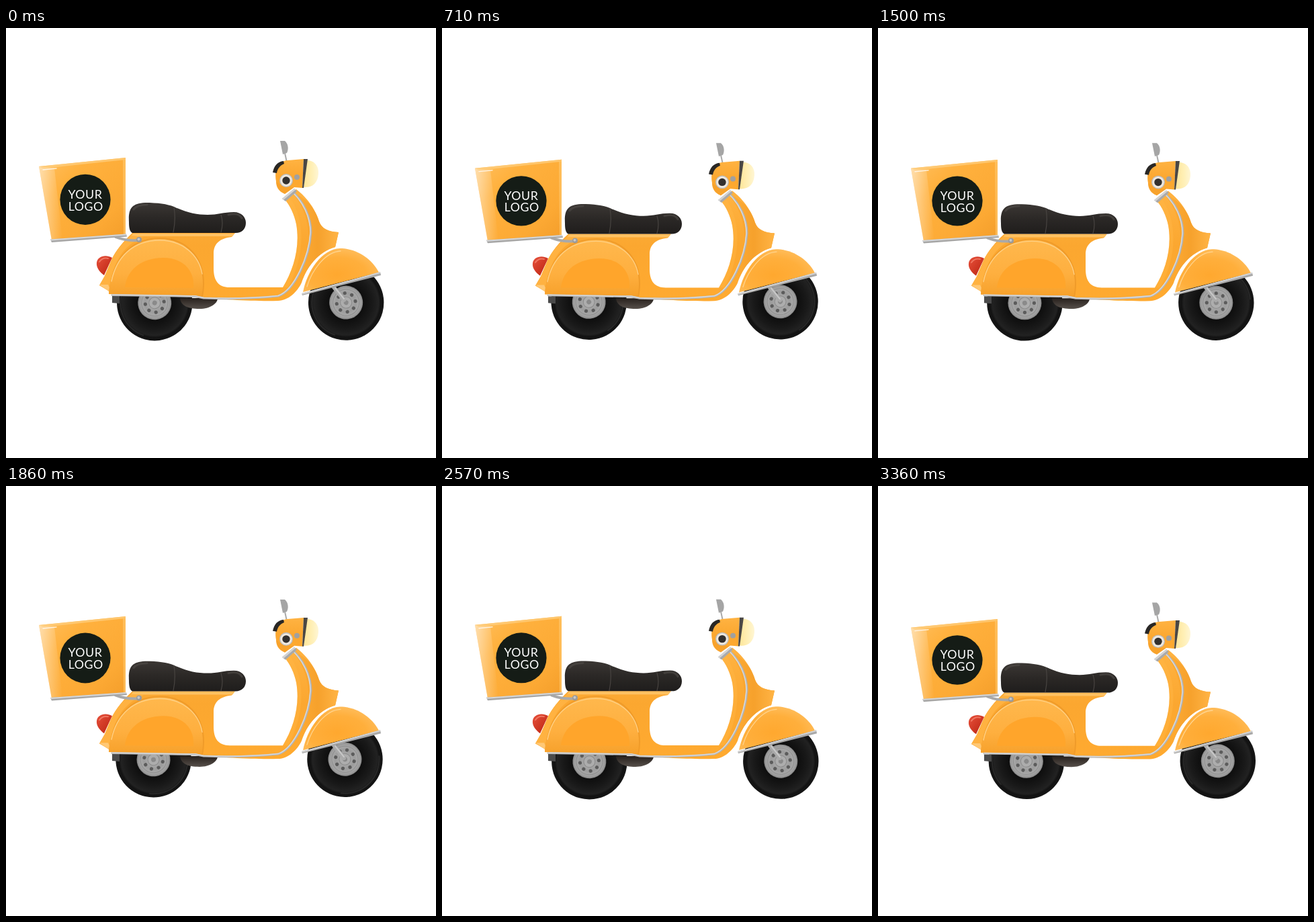
Write an HTML page that moves like this. It is 640 px wide and 640 px high and loops after 3.43 s.

```html
<!DOCTYPE html>
<html lang="en">
<head>
<meta charset="utf-8">
<title>Delivery scooter</title>
<style>
  html, body { margin: 0; width: 100%; height: 100%; overflow: hidden; background: #fff; }
  svg { display: block; width: 100vw; height: 100vh; }
  text { font: 17.8px Lato, "Open Sans", sans-serif; letter-spacing: .5px; fill: #fff; text-anchor: middle; }
  .line { fill: none; stroke-linecap: round; }
</style>
</head>
<body>
<svg viewBox="0 0 640 640">
  <defs>
    <linearGradient id="boxFace" x1="0" y1="0" x2="1" y2="1">
      <stop offset="0" stop-color="#ffc163"/><stop offset=".3" stop-color="#ffb13e"/>
      <stop offset=".75" stop-color="#fca934"/><stop offset="1" stop-color="#f39d2a"/>
    </linearGradient>
    <linearGradient id="boxSide">
      <stop offset="0" stop-color="#fff" stop-opacity=".5"/><stop offset="1" stop-color="#fff" stop-opacity="0"/>
    </linearGradient>
    <linearGradient id="paint" x1="0" y1="0" x2="0" y2="1">
      <stop offset="0" stop-color="#ffb342"/><stop offset=".5" stop-color="#fba730"/><stop offset="1" stop-color="#ffaa30"/>
    </linearGradient>
    <linearGradient id="panel" x1="0" y1="0" x2="0" y2="1">
      <stop offset="0" stop-color="#ffb84d"/><stop offset=".6" stop-color="#feaf3f"/><stop offset="1" stop-color="#f6a02a"/>
    </linearGradient>
    <linearGradient id="shield" x1="0" y1="0" x2="1" y2="0">
      <stop offset="0" stop-color="#ffae38"/><stop offset=".55" stop-color="#f6a12c"/><stop offset="1" stop-color="#ffb445"/>
    </linearGradient>
    <radialGradient id="fender" cx=".45" cy=".6" r=".65">
      <stop offset="0" stop-color="#ffa82f"/><stop offset=".6" stop-color="#ffaf3c"/><stop offset="1" stop-color="#ffbf60"/>
    </radialGradient>
    <linearGradient id="seat" x1="0" y1="0" x2="0" y2="1">
      <stop offset="0" stop-color="#3b3734"/><stop offset=".5" stop-color="#2b2826"/><stop offset="1" stop-color="#1f1d1c"/>
    </linearGradient>
    <linearGradient id="lamp">
      <stop offset="0" stop-color="#ffe69a"/><stop offset=".6" stop-color="#fff0b9"/><stop offset="1" stop-color="#fff6d5"/>
    </linearGradient>
    <linearGradient id="tail" x1="0" y1="0" x2="1" y2="1">
      <stop offset="0" stop-color="#e8513c"/><stop offset="1" stop-color="#b9220f"/>
    </linearGradient>
    <linearGradient id="engine" x1="0" y1="0" x2="0" y2="1">
      <stop offset="0" stop-color="#28211d"/><stop offset="1" stop-color="#57504b"/>
    </linearGradient>
    <radialGradient id="tyre">
      <stop offset=".45" stop-color="#0e0e0e"/><stop offset=".7" stop-color="#191919"/>
      <stop offset=".86" stop-color="#222"/><stop offset=".92" stop-color="#121212"/><stop offset="1" stop-color="#161616"/>
    </radialGradient>
    <radialGradient id="rim">
      <stop offset="0" stop-color="#b4b4b4"/><stop offset=".6" stop-color="#9c9c9c"/>
      <stop offset=".8" stop-color="#a8a8a8"/><stop offset="1" stop-color="#969696"/>
    </radialGradient>
    <g id="wheel">
      <circle r="56.2" fill="url(#tyre)"/>
      <path class="line" d="M-4 51A51 51 0 0 1-49-14" stroke="#3a3a3a" stroke-opacity=".5" stroke-width="2"/>
      <circle r="25" fill="#858585"/>
      <circle r="24" fill="url(#rim)"/>
      <circle r="19.5" fill="none" stroke="#8e8e8e"/>
      <g id="holes" fill="#5c5c5c"></g>
      <circle r="8.5" fill="#adadad" stroke="#8a8a8a"/>
      <circle r="3.5" fill="#8a8a8a"/>
    </g>
  </defs>

  <use class="wheel" data-x="219.8" data-y="408.8" href="#wheel"/>
  <use class="wheel" data-x="504.7" data-y="408.2" href="#wheel"/>

  <g id="body">
    <path class="line" d="M488 386L503 405" stroke="#a9a9a9" stroke-width="6"/>
    <path class="line" d="M490 387L503 403" stroke="#c8c8c8" stroke-width="2"/>
    <path d="M158 399H169V410L158 409Z" fill="#4b4b4b"/>
    <path d="M259 402H315C315 410 304 418 288 418C270 418 260 413 259 402Z" fill="url(#engine)"/>

    <!-- tail light -->
    <path d="M135 349C136 340 148 336 158 342L146 368C139 363 134 356 135 349Z" fill="url(#tail)"/>
    <path class="line" d="M139 348Q144 341 152 343" stroke="#ff9a83" stroke-opacity=".6" stroke-width="2"/>

    <!-- frame and floor -->
    <path d="M188 305H341L336 311C318 313 309 321 309 336V358C309 376 316 386 333 386H412
             C428 360 438 326 432 292C429 278 423 264 414 254L432 240C449 253 461 271 466 288
             C470 299 480 303 495 304L490 326C465 333 447 356 440 379C434 392 420 406 405 406
             C370 407 320 404 292 401L158 396L152 391L139 383L147 369L157 345C163 332 174 318 188 305Z" fill="url(#paint)"/>
    <path d="M427 246C449 253 461 271 466 288C470 299 480 303 495 304L490 326C465 333 447 356 440 379
             C450 340 462 290 427 246Z" fill="url(#shield)"/>
    <path d="M412 386C428 360 438 326 432 292C429 278 423 264 414 254L421 250C447 285 445 340 420 386Z" fill="#ffb647" opacity=".4"/>
    <path d="M189 306H340L337 310H186Z" fill="#ffc263"/>

    <!-- rear side panel -->
    <path d="M139 383L147 369L157 345C163 332 174 319 187 309L205 311C172 324 158 352 154 391Z" fill="#ffb241"/>
    <path d="M139 382L152 382L158 396L152 391Z" fill="#ffc875"/>
    <path d="M153 396C156 345 184 312 229 312C274 312 303 348 293 400Z" fill="#f09b29"/>
    <path d="M153 396C156 346 186 314 229 314C272 314 301 350 291 400Z" fill="url(#panel)"/>
    <path class="line" d="M157 377C164 342 188 316 229 316C262 316 287 337 292 366" stroke="#ffd084" stroke-width="1.4"/>
    <path d="M177 386C180 358 204 342 234 342C264 342 281 361 279 387Z" fill="#ffa52b"/>

    <!-- chrome trim -->
    <path class="line" d="M158 397.5L282 399.5L294 402C340 404 385 401 405 399C430 391 452 340 454 304C454 280 442 259 429 246"
          stroke="#b4b4b4" stroke-width="3"/>
    <path class="line" d="M158 397L282 399L294 401.5C340 403.5 385 400.5 405 398.5C429 390 451 340 453 304C453 280 441 259 429 247"
          stroke="#dadada" stroke-width="1.5"/>

    <!-- front fender -->
    <path d="M442 393C448 362 470 329 497 328C525 328 547 347 555 364Z" fill="url(#fender)"/>
    <path class="line" d="M448 385C455 361 475 333 498 332" stroke="#ffd48e" stroke-width="1.3"/>
    <path d="M440 395L557 363L558 368L441 398Z" fill="#a8a8a8"/>
    <path d="M440 395L557 363V365L440 397Z" fill="#d5d5d5"/>

    <!-- seat -->
    <path d="M183 289C182 270 186 261 207 260C226 260 240 262 250 266C269 275 284 278 300 278
             C315 278 324 274 339 274C351 274 357 282 357 290C357 299 351 305 342 305H188C184 303 183 297 183 289Z" fill="url(#seat)"/>
    <path class="line" d="M250 267Q253 285 249 304M320 278Q324 290 320 304" stroke="#484441" stroke-width="1.2"/>
    <path class="line" d="M190 270Q195 263 210 263M331 278Q346 274 351 283" stroke="#54504c" stroke-opacity=".5" stroke-width="3"/>

    <!-- delivery box -->
    <path class="line" d="M163 311Q178 317 197 316" stroke="#a9a9a9" stroke-width="4"/>
    <circle cx="198" cy="315" r="4" fill="#9b9b9b"/>
    <circle cx="197.5" cy="314.5" r="2" fill="#c8c8c8"/>
    <path d="M49 206L178 193V308L68 316Z" fill="url(#boxFace)"/>
    <path d="M49 206L72 208L84 314L68 316Z" fill="url(#boxSide)"/>
    <path d="M49 206L178 193V196L55 209Z" fill="#ffd182" opacity=".7"/>
    <path class="line" d="M55 211L75 209" stroke="#fff" stroke-opacity=".75" stroke-width="1.5"/>
    <path d="M174 195L178 193V308L175 307Z" fill="#ffc467" opacity=".7"/>
    <path d="M66 314.5L179 306.5L180 310.5L68 319Z" fill="#a6a6a6"/>
    <path d="M66 314.5L179 306.5V308.5L67 316.5Z" fill="#d6d6d6"/>
    <circle cx="118" cy="255.3" r="37.6" fill="#151c16"/>
    <text x="117.9" y="253.6">YOUR</text>
    <text x="118.7" y="271.6">LOGO</text>

    <!-- handlebar, mirror and headlamp -->
    <path class="line" d="M415 186L418 200" stroke="#aaa" stroke-width="2"/>
    <path d="M408 168H415C420 172 421 180 418 186L412 188Z" fill="#a5a5a5"/>
    <path d="M402 228C399 210 405 198 419 197L443 195L441 238L429 237L415 247C405 243 402 236 402 228Z" fill="url(#paint)"/>
    <path d="M402 228C403 238 407 243 415 247L429 237Q412 239 402 228Z" fill="#ed9828" opacity=".4"/>
    <path d="M397 215C399 205 404 199 413 198L414 202C407 205 404 210 403 216Z" fill="#292725"/>
    <circle cx="417" cy="227" r="10" fill="#bdbdbd"/>
    <circle cx="417" cy="227" r="8.7" fill="#eee8df"/>
    <circle cx="417" cy="227" r="5.7" fill="#33302e"/>
    <circle cx="433" cy="222" r="4" fill="#a0a0a0"/>
    <path d="M448 197C460 197 466 207 465 217C464 231 456 238 443 237Z" fill="url(#lamp)"/>
    <path d="M443 195L449 195L443 238L441 238Z" fill="#4a4744"/>
    <path d="M411 254L429 239L433 243L416 258Z" fill="#a9a9a9"/>
    <path d="M411 254L429 239L430.5 241L413 256Z" fill="#d4d4d4"/>
  </g>
</svg>
<script>
  const LOOP = 3430, FRAMES = 48, FPS = 14, TAU = Math.PI * 2;
  const BOUNCE = 0.2255, SPIN = 0.257;   // turns per drawn frame
  const GROUND = 425, SQUASH = 0.0238, WOBBLE = 1.5, TILT = 15;
  const body = document.getElementById("body");
  const wheels = document.querySelectorAll(".wheel");

  document.getElementById("holes").innerHTML = Array.from({ length: 8 }, (_, i) =>
    `<circle cx="14" r="2.6" transform="rotate(${i * 45 + 22})"/>`).join("");

  function draw(ms) {
    const frame = Math.min(FRAMES - 1, Math.floor((ms % LOOP + 5) * FPS / 1000));
    const press = (1 - Math.cos(frame * BOUNCE * TAU)) / 2;
    const scale = 1 - SQUASH * press;
    const turn = frame * SPIN * 360 + TILT;
    body.setAttribute("transform", `translate(0 ${GROUND * (1 - scale)}) scale(1 ${scale})`);
    // The tyres sit slightly off their axles.
    for (const { dataset: { x, y }, ...rest } of [...wheels].map(el => ({ el, dataset: el.dataset })))
      rest.el.setAttribute("transform", `translate(${x} ${y}) rotate(${turn}) translate(${WOBBLE} 0)`);
  }

  const start = performance.now();
  function tick() {
    draw(performance.now() - start);
    requestAnimationFrame(tick);
  }
  tick();
</script>
</body>
</html>
```
